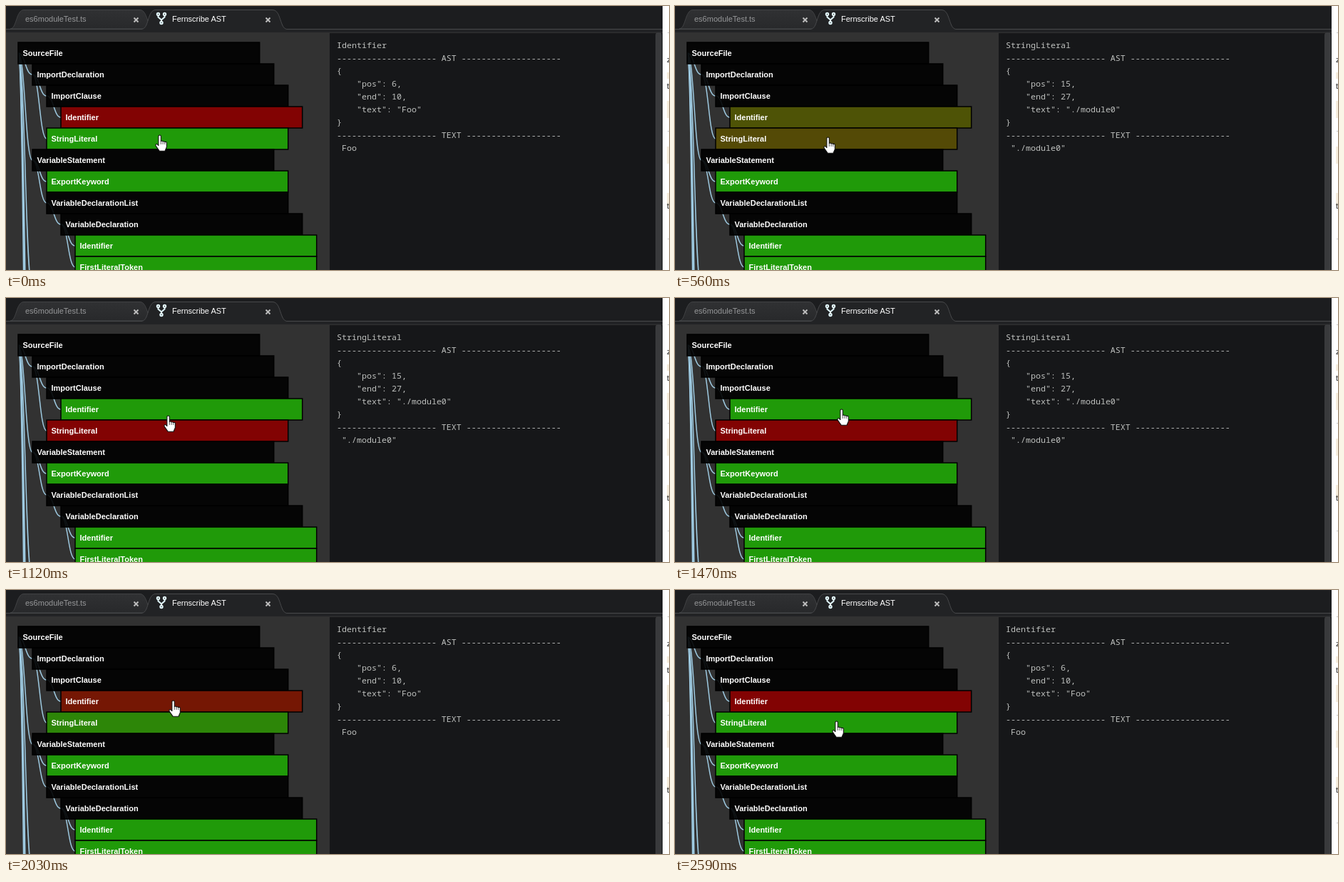
These frames come from a looping animation (930 by 370 pixels, 3.01 s). An HTML page:

```html
<!DOCTYPE html>
<html lang="en">
<head>
<meta charset="utf-8">
<title>Syntax tree viewer</title>
<style>
  html, body { margin: 0; width: 100%; height: 100%; overflow: hidden; background: #1c1d1f; }
  svg { display: block; width: 930px; height: 370px; }
  text { white-space: pre; }
  .tab { font: 11px Arial, "Liberation Sans", sans-serif; }
  .label { font: bold 11px Arial, "Liberation Sans", sans-serif; fill: #fff; }
  .code { font: 11.667px "Noto Sans Mono", monospace; fill: #bfc1bf; }
  .link { fill: none; stroke: #9ecae1; stroke-width: 1.5; }
  .close { stroke: #bbb; stroke-width: 2; }
  .row { stroke: #000; stroke-width: 1.5; }
</style>
</head>
<body>
<svg id="stage" viewBox="0 0 930 370">
  <defs>
    <linearGradient id="idle" x2="0" y2="1">
      <stop stop-color="#303133"/><stop offset="1" stop-color="#28292b"/>
    </linearGradient>
    <path id="x" class="close" d="M-3 -3L3 3M3 -3L-3 3"/>
  </defs>

  <rect width="921" height="37" fill="#1c1d1f"/>
  <path d="M6 32C15 32 14 5.500 25 5.500H188C199 5.500 198 32 207 32Z" fill="url(#idle)" stroke="#414244"/>
  <path d="M0 32.500H190C201 32 198 5.500 210 5.500H374C386 5.500 384 32 394 32.500H921V37H0Z" fill="#222325"/>
  <path d="M0 32.500H190C201 32 198 5.500 210 5.500H374C386 5.500 384 32 394 32.500H921" fill="none" stroke="#48494b"/>
  <text class="tab" x="27" y="22" fill="#969799">es6moduleTest.ts</text>
  <text class="tab" x="233" y="22" fill="#fff">Fernscribe AST</text>
  <use href="#x" x="182.500" y="19.500"/>
  <use href="#x" x="367.500" y="19.500"/>
  <g fill="#222325" stroke="#e4f8fc" stroke-width="2">
    <path d="M213.500 13.500V15.500L218 19.500L222.500 15.500V13.500M218 19.500V22" fill="none"/>
    <circle cx="213.500" cy="11.500" r="1.700"/>
    <circle cx="222.500" cy="11.500" r="1.700"/>
    <circle cx="218" cy="23.500" r="1.700"/>
  </g>

  <rect y="37" width="921" height="333" fill="#323232"/>
  <rect x="454" y="38" width="467" height="332" fill="#161719"/>
  <rect x="911" y="37" width="9" height="345" rx="4" fill="#393a3c"/>

  <rect x="921" width="9" height="370" fill="#fff"/>
  <g fill="#f7efdf">
    <rect x="927" y="93" width="3" height="9"/>
    <rect x="927" y="133" width="3" height="24"/>
    <rect x="927" y="197" width="3" height="24"/>
    <rect x="927" y="262" width="3" height="18"/>
  </g>
  <path d="M928 37.500H930M928 175.500H930M928 326.500H930" stroke="#ccc"/>
  <g class="tab" fill="#222">
    <text x="927" y="79">z</text><text x="927" y="116">t</text><text x="927" y="284">t</text>
  </g>

  <g id="links"></g>
  <g id="rows"></g>
  <g id="code"></g>
  <g id="hand">
    <g transform="scale(1.07)">
      <path d="M6 15V4a1.600 1.600 0 0 1 3.200 0V10L16.700 12.500V17L14.500 22.400H7.500L3 16Z" opacity=".25"/>
      <path d="M5.500 14.500V2.500a1.600 1.600 0 0 1 3.200 0V9a1.500 1.500 0 0 1 2.600.500a1.500 1.500 0 0 1 2.500.700a1.400 1.400 0 0 1 2.400 1.300V16.500L14 21.800H6.800L2.200 15.300C1 13.500 2.800 11.800 4 13Z"
        fill="#fff" stroke="#111" stroke-linejoin="round"/>
      <path d="M8.700 9.500V13M11.300 10V13M13.800 10.800V13" stroke="#333" stroke-width=".8"/>
    </g>
  </g>
</svg>
<script>
const LOOP = 3010, STEP = 70, FADE = 400;
const GREEN = [32, 154, 9], RED = [130, 3, 3];

// label, depth, parent row, leaf
const tree = [
  ["SourceFile", 0], ["ImportDeclaration", 1, 0], ["ImportClause", 2, 1],
  ["Identifier", 3, 2, true], ["StringLiteral", 2, 1, true],
  ["VariableStatement", 1, 0], ["ExportKeyword", 2, 5, true],
  ["VariableDeclarationList", 2, 5], ["VariableDeclaration", 3, 7],
  ["Identifier", 4, 8, true], ["FirstLiteralToken", 4, 8, true]
];
const offscreen = [11, 21, 28, 36];

// time, x, y of the pointer
const path = [
  [0, 208, 180], [70, 207, 183], [840, 207, 184], [980, 209, 180],
  [1050, 214, 172], [1120, 220, 164], [1190, 222, 161], [1260, 222, 159],
  [1400, 224, 157], [1470, 226, 155], [1540, 227, 154], [2240, 225, 161],
  [2310, 222, 169], [2380, 220, 174], [2450, 218, 179], [2520, 218, 182], [2590, 219, 183]
];

const $ = id => document.getElementById(id);
function add(parent, tag, attrs, content = "") {
  const el = document.createElementNS("http://www.w3.org/2000/svg", tag);
  for (const key in attrs) el.setAttribute(key, attrs[key]);
  el.textContent = content;
  return parent.appendChild(el);
}
const left = depth => 17 + 20 * depth;
const middle = row => 66 + 30 * row;
const rgb = c => `rgb(${c.map(Math.round)})`;
const mix = (a, b, k) => rgb(a.map((v, i) => v + (b[i] - v) * k));

function link(from, row, depth) {
  const x1 = left(tree[from][1]), y1 = middle(from), x2 = left(depth), y2 = middle(row);
  const xm = (x1 + x2) / 2;
  add($("links"), "path", { class: "link", d: `M${x1} ${y1}C${xm} ${y1} ${xm} ${y2} ${x2} ${y2}` });
}

const bars = tree.map(([label, depth, parent, leaf], i) => {
  if (i) link(parent, i, depth);
  const bar = add($("rows"), "rect", {
    class: "row", x: left(depth), y: middle(i) - 15, width: 338.7, height: 30,
    fill: leaf ? rgb(GREEN) : "#000", "fill-opacity": leaf ? 1 : .9
  });
  add($("rows"), "text", { class: "label", x: left(depth) + 6.5, y: middle(i) + 4 }, label);
  return bar;
});
offscreen.forEach(row => link(0, row, 1));

const dash = n => "-".repeat(n);
function panel(kind, pos, end, text, shown) {
  const g = add($("code"), "g", {});
  [kind, `${dash(20)} AST ${dash(20)}`, "{", `    "pos": ${pos},`, `    "end": ${end},`,
    `    "text": "${text}"`, "}", `${dash(20)} TEXT ${dash(19)}`, " " + shown
  ].forEach((line, i) => add(g, "text", { class: "code", x: 464, y: 59 + 18 * i }, line));
  return g;
}
const first = panel("Identifier", 6, 10, "Foo", "Foo");
const second = panel("StringLiteral", 15, 27, "./module0", '"./module0"');

function ease(t) {
  t = Math.min(1, Math.max(0, t));
  return t < .5 ? 4 * t ** 3 : 1 - 4 * (1 - t) ** 3;
}

function draw(time) {
  const t = Math.floor(time % LOOP / STEP) * STEP;
  const k = ease((t - 356) / FADE) - ease((t - 1758) / FADE);
  bars[3].setAttribute("fill", mix(RED, GREEN, k));
  bars[4].setAttribute("fill", mix(GREEN, RED, k));

  const swapped = t >= 420 && t < 1820;
  first.style.display = swapped ? "none" : "";
  second.style.display = swapped ? "" : "none";

  const [, x, y] = path.filter(p => p[0] <= t).pop();
  $("hand").setAttribute("transform", `translate(${x} ${y})`);
}

const start = performance.now();
function tick() {
  draw(performance.now() - start);
  requestAnimationFrame(tick);
}
tick();
</script>
</body>
</html>
```
